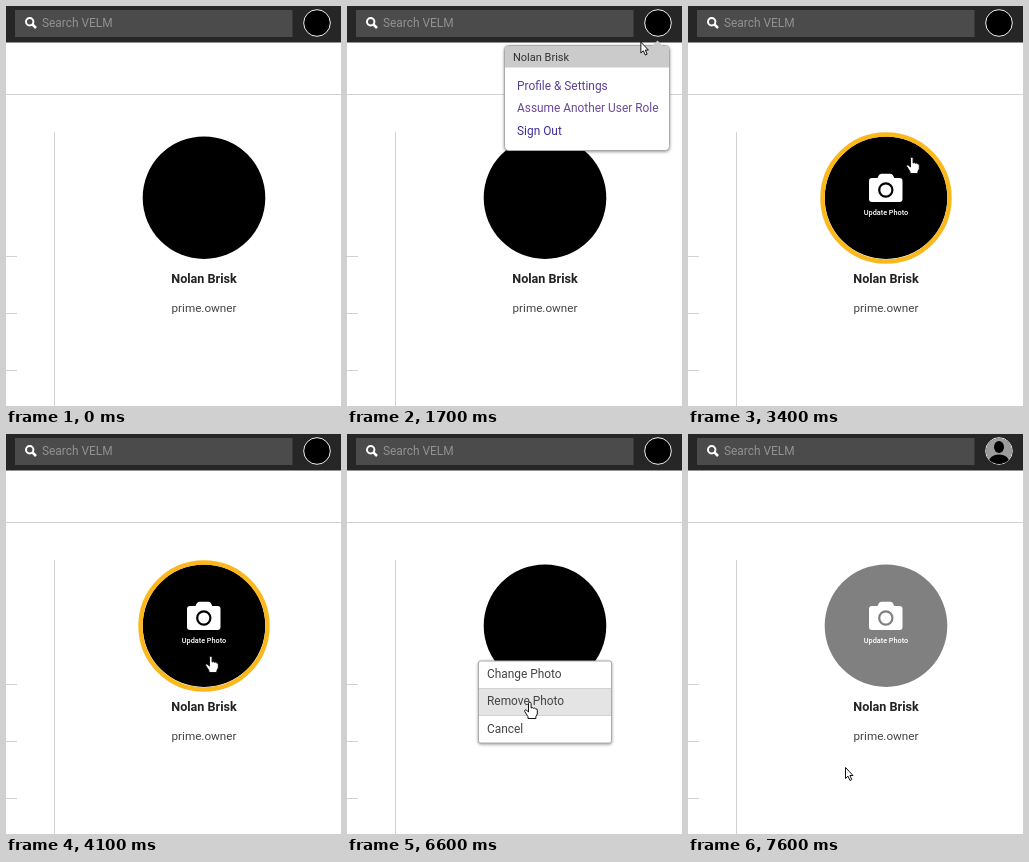
Recreate the animation shown at these times as an HTML page. Size 335 by 400 pixels, loop 9.7 s.

```html
<!DOCTYPE html>
<html lang="en">
<head>
<meta charset="utf-8">
<title>Profile photo</title>
<style>
html, body { margin: 0; width: 100%; height: 100%; overflow: hidden; background: #fff; }
svg { display: block; font: 11.9px Roboto, sans-serif; fill: #444; }
.box { fill: #fff; stroke: #aaa; filter: drop-shadow(0 1px 1.5px #0006); }
.line { stroke: #d2d2d2; }
.mid { text-anchor: middle; }
.row { fill: none; }
.row.on { fill: #e4e4e4; }
.link.on { fill: #cb3a25; text-decoration: underline; }
</style>
</head>
<body>
<svg width="335" height="400" viewBox="0 0 335 400">
  <defs><clipPath id="disc"><circle cx="311" cy="17" r="13"/></clipPath></defs>

  <rect width="335" height="36.5" fill="#262626"/>
  <rect x="9" y="4" width="277.5" height="27" fill="#4b4b4b"/>
  <g fill="none" stroke="#fff" stroke-width="2">
    <circle cx="23.7" cy="15.7" r="3.7"/>
    <path d="M26.5 18.5L30 22" stroke-width="2.5"/>
  </g>
  <text x="36" y="20.5" fill="#929292">Search VELM</text>
  <path class="line" d="M0 88.5H335M48.5 126V400M0 250.5H11M0 307.5H11M0 364.5H11"/>

  <circle cx="311" cy="17" r="13.3" stroke="#eee" fill="#000"/>
  <g id="person" clip-path="url(#disc)">
    <circle cx="311" cy="17" r="13" fill="#9b9b9b"/>
    <g fill="#000"><ellipse cx="311" cy="13" rx="5" ry="6"/><ellipse cx="311" cy="28.5" rx="10.5" ry="8"/></g>
  </g>

  <circle id="photo" cx="198" cy="191.7" r="61.3"/>
  <circle id="ring" cx="198" cy="192" r="63.5" fill="none" stroke="#fbb81c" stroke-width="4.4"/>
  <g id="update" fill="#fff">
    <path fill-rule="evenodd" d="M184 172h5.500l1.200-2.600q.8-1.700 2.700-1.700h9q1.900 0 2.700 1.700l1.200 2.600h5.200q3 0 3 3v18q0 3-3 3h-27.500q-3 0-3-3v-18q0-3 3-3zM190.100 184a7.700 7.700 0 1 0 15.400 0a7.700 7.700 0 1 0-15.400 0z"/>
    <circle cx="197.800" cy="184" r="5.500"/>
    <text class="mid" x="198" y="208.500" font-size="7.300" font-weight="500">Update Photo</text>
  </g>
  <text class="mid" x="198" y="276.500" font-size="12.600" font-weight="700" fill="#222">Nolan Brisk</text>
  <text class="mid" x="198" y="306" font-size="11.700">prime.owner</text>

  <g id="popup">
    <rect class="box" x="157.500" y="39.500" width="165" height="105" rx="4"/>
    <path d="M158 61.500V43q0-3 3-3H305l5.500-5.500L316 40h3q3 0 3 3v18.500z" fill="#cbcbcb"/>
    <text x="166" y="54.500" font-size="11" fill="#333">Nolan Brisk</text>
    <text class="link" x="170" y="83.500" fill="#5b3f98">Profile &amp; Settings</text>
    <text class="link" x="170" y="106" fill="#6b4a98">Assume Another User Role</text>
    <text class="link" x="170" y="128.500" fill="#3f2f98">Sign Out</text>
  </g>

  <g id="menu">
    <rect class="box" x="131.500" y="227" width="133" height="82" rx="2"/>
    <rect class="row" x="132" y="227.500" width="132" height="26.500"/>
    <rect class="row" x="132" y="254.500" width="132" height="26.500"/>
    <rect class="row" x="132" y="281.500" width="132" height="27"/>
    <path class="line" d="M132 254.500H264M132 281.500H264"/>
    <text x="140" y="244">Change Photo</text>
    <text x="140" y="271">Remove Photo</text>
    <text x="140" y="298.500">Cancel</text>
  </g>

  <g id="cursor" fill="#fff" stroke="#111">
    <path id="arrow" d="M.5.500V11.500L3 9.200L5 13.500L6.800 12.600L4.900 8.500H8z"/>
    <path id="hand" d="M-1.500 10V1.500q0-1.300 1.300-1.300t1.300 1.300V6q1.200-1 2.300.3q1.300-.7 2.200.5q1.700-.3 1.700 1.500v3.700l-1.400 2.500v2H-2v-1.800L-5.200 9.600q-.6-1.500.7-1.700q1.200 0 3 2.100z"/>
  </g>
</svg>
<script>
const LOOP = 9700, STEP = 100;
// cursor stops: time, x, y
const path = [
  [200, 321, 62], [700, 311, 20], [1400, 311, 20], [2300, 243, 80], [3000, 243, 80],
  [3800, 205, 222], [5400, 205, 222.500], [5900, 183, 268], [6800, 183, 268], [7500, 157, 333]
];
const $ = id => document.getElementById(id);
const show = (id, on) => $(id).style.display = on ? "" : "none";
const between = (v, a, b) => v >= a && v < b;
const links = [...document.querySelectorAll(".link")];
const rows = [...document.querySelectorAll(".row")];

function cursorAt(t) {
  const next = path.findIndex(p => p[0] > t);
  if (next < 0) return path.at(-1).slice(1);
  const [t1, x1, y1] = path[next], [t0, x0, y0] = path[Math.max(0, next - 1)];
  let k = t1 > t0 ? (t - t0) / (t1 - t0) : 0;
  k = k * k * (3 - 2 * k);
  return [x0 + (x1 - x0) * k, y0 + (y1 - y0) * k];
}

function draw(t) {
  const [x, y] = cursorAt(t);
  const popup = between(t, 1200, 2900), menu = between(t, 4500, 6900), removed = t >= 7100;
  const onLink = popup && between(x, 170, 312) ? Math.floor((y - 68) / 22.500) : -1;
  const onRow = menu ? Math.floor((y - 227) / 27.300) : -1;
  const onPhoto = !popup && onRow < 0 && Math.hypot(x - 198, y - 192) < 61;
  const onAvatar = Math.hypot(x - 311, y - 17) < 14;

  links.forEach((el, i) => el.classList.toggle("on", i === onLink));
  rows.forEach((el, i) => el.classList.toggle("on", i === onRow));
  show("popup", popup);
  show("menu", menu);
  show("person", removed);
  show("ring", onPhoto);
  show("update", onPhoto || removed);
  $("photo").setAttribute("fill", removed ? "#808080" : "#000");

  const hand = onPhoto || onAvatar || onRow >= 0 || between(onLink, 0, 3);
  show("cursor", t >= path[0][0]);
  show("hand", hand);
  show("arrow", !hand);
  $("cursor").setAttribute("transform", `translate(${x} ${y})`);
}

function tick() {
  draw(Math.floor(performance.now() % LOOP / STEP) * STEP);
  requestAnimationFrame(tick);
}
tick();
</script>
</body>
</html>
```
